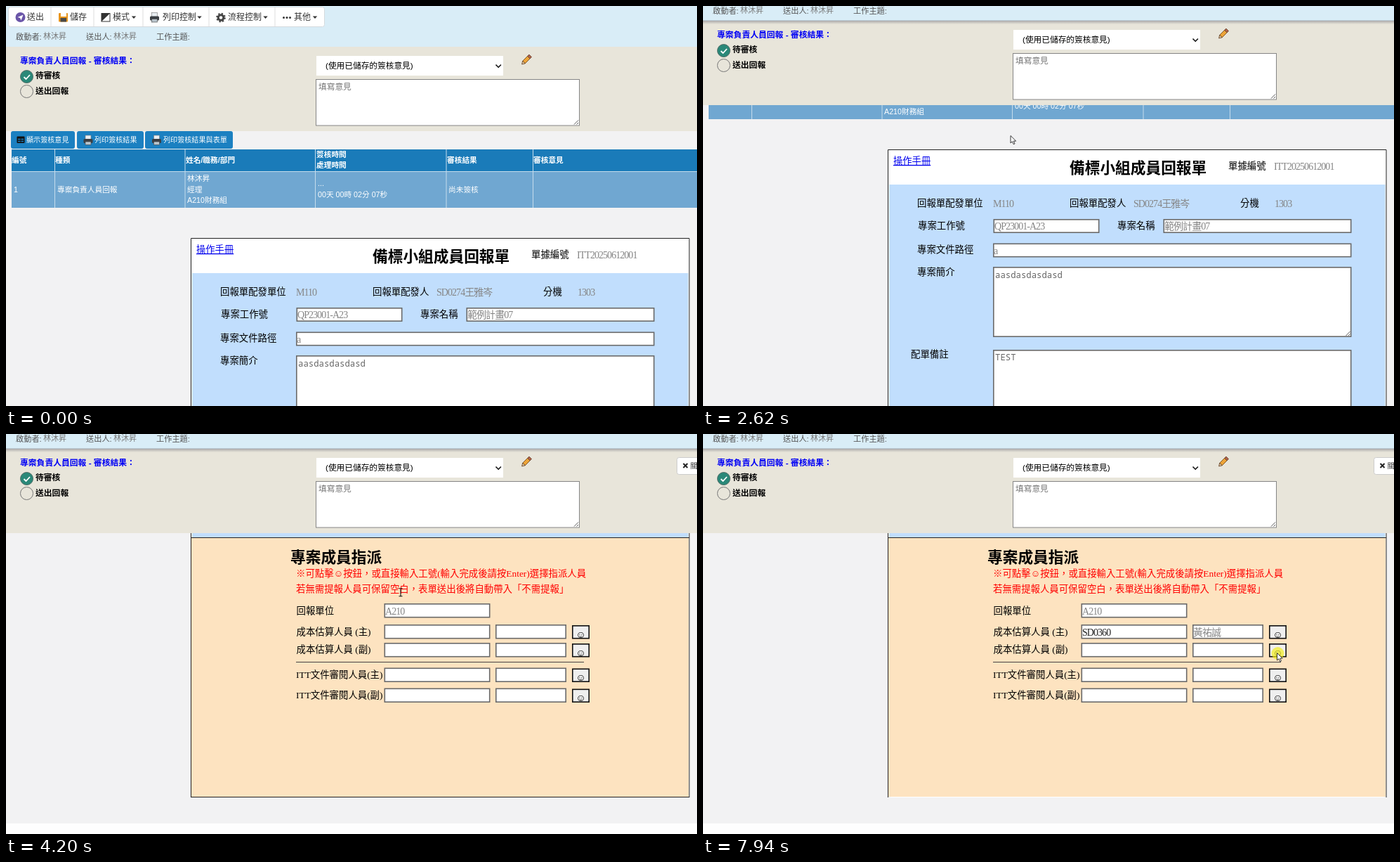
Write an HTML page that moves like this. It is 984 by 569 pixels and loops after 8000 ms.

```html
<!DOCTYPE html>
<html lang="zh-TW">
<head>
<meta charset="utf-8">
<style>
html, body { margin: 0; height: 100%; overflow: hidden; background: #f2f2f3; }
svg { display: block; width: 100%; height: 100%; }
text { font-family: "Liberation Sans", "Noto Sans CJK TC", sans-serif; }
.serif text { font-family: "Liberation Serif", "Noto Sans CJK TC", serif; font-weight: 300; }
.serif .value { letter-spacing: -.95px; }
.serif .mono { font-family: "Noto Sans Mono", monospace; font-weight: 400; }
.serif .face { font-family: "DejaVu Sans", sans-serif; }
#popup text { font-family: "Open Sans", "Noto Sans CJK TC", sans-serif; }
.bold, .serif .bold { font-weight: bold; }
</style>
</head>
<body>
<svg viewBox="0 0 984 569">
  <defs>
    <linearGradient id="shade" x2="0" y2="1">
      <stop stop-color="#556" stop-opacity=".45"/><stop offset="1" stop-color="#556" stop-opacity="0"/>
    </linearGradient>
  </defs>
  <g id="doc"></g>
  <g id="head"></g>
  <g id="popup"></g>
  <g id="pointer"></g>
</svg>
<script>
const $ = id => document.getElementById(id);

// y is the vertical middle of the line of text
const text = (x, y, size, str, fill = '#000', attrs = '') =>
  `<text x="${x}" y="${y + size * .37}" font-size="${size}" fill="${fill}" ${attrs}>${str}</text>`;
const rect = (x, y, x2, y2, fill, attrs = '') =>
  `<rect x="${x}" y="${y}" width="${x2 - x}" height="${y2 - y}" fill="${fill}" ${attrs}/>`;
const path = (d, stroke, width = 1, fill = 'none', attrs = '') =>
  `<path d="${d}" stroke="${stroke}" stroke-width="${width}" fill="${fill}" ${attrs}/>`;
const circle = (x, y, r, fill, attrs = '') => `<circle cx="${x}" cy="${y}" r="${r}" fill="${fill}" ${attrs}/>`;
const at = (x, y, body) => `<g transform="translate(${x} ${y})">${body}</g>`;

const bold = 'class="bold"';
const label = (x, y, str, fill) => text(x, y, 13.4, str, fill);
const value = (x, y, str, fill = '#858585', attrs = '') => text(x, y, 14, str, fill, 'class="value" ' + attrs);
const mono = (x, y, str) => text(x, y, 12.3, str, '#666', 'class="mono"');
const field = (x, y, x2, y2) => rect(x + .8, y + .8, x2 - .8, y2 - .8, '#fff', 'stroke="#6a6a6a" stroke-width="1.6"');
const grip = (x, y) => path(`M${x - 8} ${y - 2}l6-6M${x - 4.5} ${y - 2}l2.5-2.5`, '#555');
const area = (x, y, x2, y2) => field(x, y, x2, y2) + grip(x2, y2);

const printer = (x, y) => at(x, y,
  rect(-4, -7, 4, 0, '#e9eef2', 'stroke="#777" stroke-width=".6"') +
  rect(-6.5, -2, 6.5, 4, '#3b3f44', 'rx="1.5"') + rect(-4, 2, 4, 6.5, '#b9c4cc', 'stroke="#444" stroke-width=".6"'));

const [starter, issuer, member, project] = ['林沐昇', 'SD0274王雅岑', '黃祐誠', '範例計畫07'];

function buildHead() {
  const icons =
    circle(20.5, 16, 7, '#6a55a8') + path('M16.5 16l8-3.5-3 8-1.5-3.5z', 'none', 0, '#fff') +
    rect(75, 10, 88, 22.5, '#e8951c', 'rx="1"') + rect(78, 10, 86, 15, '#fff') + rect(77.5, 17, 86, 22.5, '#4a4a4a') +
    rect(136, 10.5, 148, 22, '#fff', 'stroke="#333"') + path('M136 22V10.5H148z', 'none', 0, '#333') +
    printer(211.5, 16.5) +
    circle(306, 16.5, 3.8, 'none', 'stroke="#444" stroke-width="3"') +
    circle(306, 16.5, 5.8, 'none', 'stroke="#444" stroke-width="2" stroke-dasharray="2.28 2.28"') +
    [395.5, 400, 404.5].map(x => circle(x, 16.5, 1.5, '#333')).join('');
  const menu = [[30, '送出'], [91, '儲存'], [152, '模式', 182], [223, '列印控制', 275.5], [316, '流程控制', 369.5], [410, '其他', 440]]
    .map(([x, str, arrow]) => text(x, 15.5, 12, str, '#333') +
      (arrow ? path(`M${arrow - 3.2} 14.5h6.4l-3.2 3.6z`, 'none', 0, '#333') : '')).join('');
  const pencil = at(741, 76.5,
    `<g transform="rotate(-45)">${rect(-5, -2.5, 5, 2.5, '#eda438', 'stroke="#6b451c" stroke-width=".8"')}` +
    rect(5, -2.5, 8, 2.5, '#b7654f', 'stroke="#59351c" stroke-width=".8"') +
    path('M-5-2.5L-9 0l4 2.5z', '#59351c', .8, '#f3d9aa') + '</g>');

  $('head').innerHTML =
    rect(0, 58, 984, 178, '#e8e5da') + rect(0, 0, 984, 58, '#d9edf7') +
    rect(0, 57.5, 984, 63, 'url(#shade)', 'id="shadow"') +
    rect(3.5, 1.5, 453.5, 29.5, '#fff', 'rx="3" stroke="#d5dade"') +
    [64, 125, 195, 289, 383].map(x => rect(x - .5, 2, x + .5, 29, '#ddd')).join('') + icons + menu +
    text(14, 43.5, 11.2, '啟動者:', '#555') + text(53, 43, 11, starter, '#777') +
    text(114, 43.5, 11.2, '送出人:', '#555') + text(153, 43, 11, starter, '#777') +
    text(214, 43.5, 11.2, '工作主題:', '#555') +
    text(20, 78, 11.8, '專案負責人員回報 - 審核結果：', '#0000f5', bold) +
    circle(29.5, 100.5, 9, '#2a8878', 'stroke="#4d6a64"') + path('M25.5 101l3 3 5.5-6', '#fff', 1.8) +
    circle(29.5, 121.5, 9, 'none', 'stroke="#777"') +
    text(42, 99, 11.8, '待審核', '#000', bold) + text(42, 120.5, 11.8, '送出回報', '#000', bold) +
    rect(442, 71, 708, 99, '#fff') + text(455, 85, 11.7, '(使用已儲存的簽核意見)') +
    path('M697.5 83.5l3.7 3.7 3.7-3.7', '#111', 1.6) + pencil +
    rect(441.5, 104.5, 816.5, 170, '#fff', 'stroke="#858585"') + grip(817, 170.5) +
    text(445, 114.5, 11.7, '填寫意見', '#777') +
    `<g id="close">${rect(955.5, 70.5, 996, 94.5, '#fff', 'rx="3" stroke="#ccc"')}` +
    path('M964.5 79l6 6m0-6l-6 6', '#222', 2) + text(974.5, 82, 10.3, '關閉', '#333') + '</g>';
}

function buildTable() {
  const button = (x, x2, tx, str) => rect(x, 178, x2, 203, '#1b80c1', 'rx="3"') + text(tx, 190, 10.1, str, '#fff');
  const cell = (x, y, str, attrs) => text(x, y, 10.7, str, '#fff', attrs);
  const title = (x, y, str) => cell(x, y, str, bold);
  return button(7, 98, 29, '顯示簽核意見') + button(101, 196, 126, '列印簽核結果') + button(198, 323, 224, '列印簽核結果與表單') +
    rect(15.5, 185.5, 26.5, 195, '#111', 'rx="1"') + path('M17 189.5h3.5m1 0H25M17 192.5h3.5m1 0H25', '#1b80c1', 1.5) +
    printer(117, 191) + printer(214.5, 191) +
    rect(8, 204, 984, 235, '#1a7bb9') + rect(8, 235, 984, 287, '#70a7d1') +
    path('M8 235.5H984M69.5 204V287M255 204V287M440.5 204V287M627 204V287M750.5 204V287', '#c5dcec') +
    title(8, 219, '編號') + title(70, 219, '種類') + title(256, 219, '姓名/職務/部門') +
    title(442, 211, '簽核時間') + title(442, 226.5, '處理時間') + title(628, 219, '審核結果') + title(751, 219, '審核意見') +
    cell(11, 261, '1') + cell(73, 261, '專案負責人員回報') +
    cell(258, 245, starter) + cell(258, 261, '經理') + cell(258, 276.5, 'A210財務組') +
    cell(444, 252, '...') + cell(444, 268, '00天 00時 02分 07秒') + cell(630, 261, '尚未簽核');
}

function buildForm() {
  const picker = y => field(538.5, y - 10, 689.5, y + 10.5) + field(697, y - 10, 798, y + 10.5) +
    rect(806.8, y - 8.2, 830.2, y + 9.7, '#efefef', 'stroke="#111" stroke-width="1.6"') +
    text(818.3, y + 3.5, 14, '☺', '#000', 'class="face" text-anchor="middle"');
  return '<g class="serif">' +
    rect(263, 330, 973.5, 1101, '#fff') + rect(265, 380, 971.5, 731, '#c1defd') + rect(264, 731, 972, 1100, '#fde3c0') +
    path('M263.5 1101V330.5H973V1101M263 731.5H973', '#222') + path('M263 1100.5H973', '#222', 1, 'none', 'id="base"') +
    text(271, 346, 13.3, '操作手冊', '#0000ee', 'text-decoration="underline"') +
    text(522, 355.5, 21.7, '備標小組成員回報單', '#000', bold) +
    label(748, 353.5, '單據編號') + value(813, 354, 'ITT20250612001') +
    label(305, 406, '回報單配發單位') + value(413, 407, 'M110') +
    label(522, 406, '回報單配發人') + value(613, 407, issuer) + label(765, 406, '分機') + value(814, 407, '1303') +
    label(306, 438, '專案工作號') + field(413.5, 429, 564.5, 449) + value(415, 439, 'QP23001-A23') +
    label(590, 438, '專案名稱') + field(655.5, 429, 923.5, 449) + value(657, 439, project) +
    label(305, 472.5, '專案文件路徑') + field(413, 463.5, 923.5, 483.5) + value(414, 474, 'a') +
    label(305, 504, '專案簡介') + area(413, 497, 923.5, 597) + mono(416, 508, 'aasdasdasdasd') +
    label(296, 621.5, '配單備註') + area(413, 615, 923.5, 715) + mono(416, 625.5, 'TEST') +
    text(405, 758.5, 21.7, '專案成員指派', '#000', bold) +
    label(413, 782, '※可點擊☺按鈕，或直接輸入工號(輸入完成後請按Enter)選擇指派人員', '#f00') +
    label(413, 804.5, '若無需提報人員可保留空白，表單送出後將自動帶入「不需提報」', '#f00') +
    label(413.5, 835, '回報單位') + field(538.5, 825, 689.5, 845.5) + value(540, 835.5, 'A210') +
    label(413.5, 865, '成本估算人員 (主)') + picker(865) +
    label(413.5, 890.5, '成本估算人員 (副)') + picker(891) +
    path('M413 908.5H823', '#444') +
    label(413, 926, 'ITT文件審閱人員(主)') + picker(926.5) +
    label(413, 955, 'ITT文件審閱人員(副)') + picker(955.5) +
    rect(539, 855.5, 689, 875.5, '#fff', 'id="focus" rx="2" stroke="#000" stroke-width="2"') +
    value(540, 865.5, '', '#222', 'id="typed"') + rect(0, 858.5, 1, 872, '#000', 'id="caret"') +
    value(698, 865.5, member, undefined, 'id="member"') + '</g>';
}

buildHead();
$('doc').innerHTML = rect(0, 1138, 984, 1200, '#fefefe') + buildTable() + buildForm();
$('popup').innerHTML =
  rect(573.5, 291.5, 836, 383, '#282828', 'id="panel" rx="6" stroke="#8a8580"') +
  path('M585 292l6.5-6.5 6.5 6.5z', 'none', 0, '#282828') +
  text(585, 309, 9.9, '已儲存資訊', '#e4e4e4') + path('M816.5 305.5l6 6m0-6l-6 6', '#eee', 1.1) +
  text(585, 336.5, 11, '', '#f2f2f2', 'id="first"') + text(585, 364.5, 11, 'SD0360', '#f2f2f2', 'id="second"');
$('pointer').innerHTML =
  circle(1.5, 1, 9, '#f2ee10', 'id="click" opacity=".65"') +
  path('M.5.5V11l2.5-2.3 1.7 4 1.8-.8-1.7-3.8h3.4z', '#222', .9, '#fff', 'id="arrow"') +
  path('M-2.5-5.5h2l.5.5.5-.5h2M0-5V5M-2.5 5.5h2l.5-.5.5.5h2', '#111', 1.1, 'none', 'id="beam"');

const scrollKeys = [[1780, 0], [1870, 13], [2620, 126], [3480, 389], [4100, 584]];
const pointerKeys = [[70, 573, 49], [200, 573, 49], [380, 357, 238], [480, 357, 238], [670, 424, 236], [930, 424, 236],
  [1150, 354, 200], [1450, 434, 99], [1740, 427, 178], [1870, 426.5, 179], [2620, 437.5, 184], [3480, 453, 181],
  [4200, 562, 225], [4270, 561, 243], [4550, 536, 268], [4880, 550, 284], [5150, 550, 284], [5490, 568, 292],
  [6580, 568, 292], [7340, 600, 303], [7600, 720, 319], [7800, 817, 311]];
const typeTimes = [5890, 6130, 6320, 6390, 6580, 6650];

function track(keys, t) {
  const i = keys.findIndex(k => k[0] > t);
  if (i === 0) return keys[0].slice(1);
  if (i < 0) return keys[keys.length - 1].slice(1);
  const [a, b] = [keys[i - 1], keys[i]], p = (t - a[0]) / (b[0] - a[0]);
  return a.slice(1).map((v, j) => v + (b[j + 1] - v) * p);
}
const show = (id, on) => $(id).setAttribute('visibility', on ? 'visible' : 'hidden');
const move = (id, x, y) => $(id).setAttribute('transform', `translate(${x} ${y})`);

function draw(t) {
  const scroll = Math.round(track(scrollKeys, t)[0]);
  move('doc', 0, -scroll);
  move('head', 0, -Math.min(scroll, 37));
  show('shadow', scroll >= 37);
  show('close', t >= 3550);
  show('base', t < 6900);

  const typed = typeTimes.filter(k => t >= k), focused = t >= 5150 && t < 7940;
  $('typed').textContent = 'SD0360'.slice(0, typed.length);
  const lastKey = typed.length ? typed[typed.length - 1] : 5150;
  show('focus', focused);
  show('caret', focused && Math.floor((t - lastKey) / 560) % 2 === 0);
  $('caret').setAttribute('x', 540 + (typed.length && $('typed').getComputedTextLength()));
  show('member', t >= 7000);

  const narrowed = t >= 6580;
  $('popup').setAttribute('opacity', t < 6900 ? Math.min(1, Math.max(0, (t - 5250) / 200)) : 0);
  $('panel').setAttribute('height', narrowed ? 63.5 : 91.5);
  $('first').textContent = narrowed ? 'SD0360' : 'SD0191';
  $('second').textContent = narrowed ? '' : 'SD0360';

  const beam = t > 2850 && t < 5300;
  move('pointer', ...track(pointerKeys, t));
  show('arrow', t >= 70 && !beam);
  show('beam', beam);
  show('click', t >= 7940);
}

const start = performance.now();
function frame() {
  draw((performance.now() - start) % 8000);
  requestAnimationFrame(frame);
}
frame();
</script>
</body>
</html>
```
